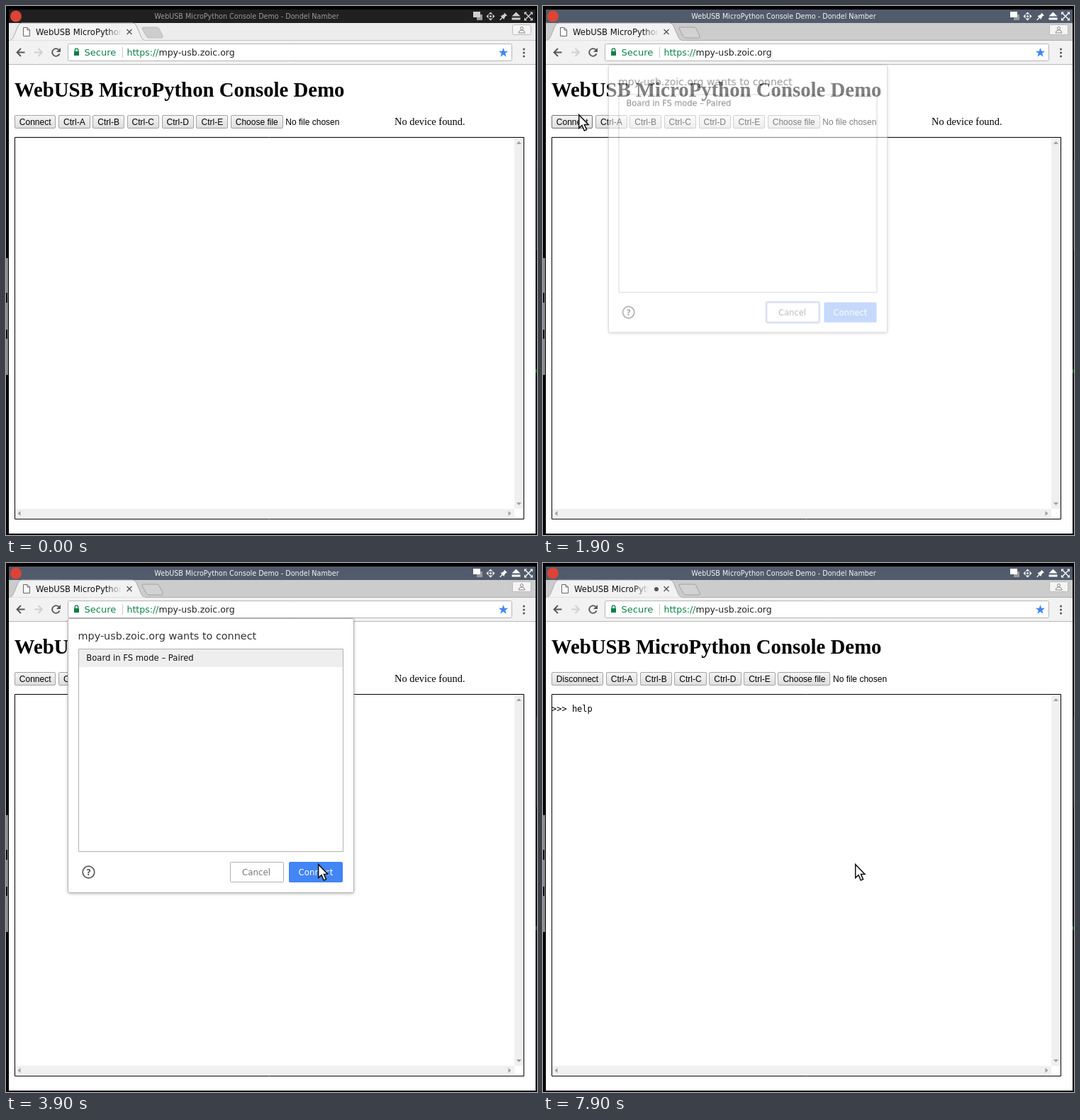
These frames come from a looping animation (749 px wide and 747 px high, 8 s). An HTML page with a canvas:

```html
<!DOCTYPE html>
<html lang="en">
<head>
<meta charset="utf-8">
<title>WebUSB MicroPython Console Demo</title>
<style>
  html, body { margin: 0; width: 100%; height: 100%; overflow: hidden; background: #000; }
  canvas { display: block; }
</style>
</head>
<body>
<canvas id="stage" width="749" height="747"></canvas>
<script>
const stage = document.getElementById('stage');
const screen = stage.getContext('2d');
const layer = Object.assign(document.createElement('canvas'), { width: 749, height: 747 });
const overlay = layer.getContext('2d');
let ctx = screen;

const LOOP = 8000, STEP = 100;
const UI = '"DejaVu Sans", sans-serif';
const SERIF = '"Liberation Serif", serif';
const SANS = '"Liberation Sans", sans-serif';
const MONO = '"DejaVu Sans Mono", monospace';

// time, x, y of the pointer tip
const POINTER = [
  [400, 92, 10], [500, 102, 28], [600, 117, 46],
  [1000, 112, 60], [1100, 92, 95], [1200, 68, 128], [1300, 54, 148], [1400, 50, 153],
  [2000, 84, 163], [2100, 230, 206], [2200, 389, 253], [2400, 307, 185], [2700, 230, 136],
  [3500, 242, 156], [3600, 288, 232], [3700, 352, 326], [3800, 414, 402], [3900, 440, 425]
];

const clamp = v => Math.max(0, Math.min(1, v));

function mix(a, b, k) {
  return `rgb(${a.map((v, i) => Math.round(v + (b[i] - v) * k)).join(',')})`;
}

function rect(x, y, w, h, fill) {
  ctx.fillStyle = fill;
  ctx.fillRect(x, y, w, h);
}

function box(x, y, w, h, radius, fill, stroke, lineWidth = 1) {
  ctx.beginPath();
  ctx.roundRect(x + .5, y + .5, w - 1, h - 1, radius);
  if (fill) { ctx.fillStyle = fill; ctx.fill(); }
  if (stroke) { ctx.strokeStyle = stroke; ctx.lineWidth = lineWidth; ctx.stroke(); }
}

function text(str, x, y, font, fill, align = 'left') {
  ctx.font = font;
  ctx.textAlign = align;
  ctx.fillStyle = fill;
  ctx.fillText(str, x, y);
}

function disc(x, y, r, fill) {
  ctx.beginPath();
  ctx.arc(x, y, r, 0, Math.PI * 2);
  ctx.fillStyle = fill;
  ctx.fill();
}

function ring(x, y, r, stroke, lineWidth) {
  ctx.beginPath();
  ctx.arc(x, y, r, 0, Math.PI * 2);
  ctx.strokeStyle = stroke;
  ctx.lineWidth = lineWidth;
  ctx.stroke();
}

// An SVG path placed at x, y
function shape(d, x, y, fill, stroke, lineWidth = 1) {
  const path = new Path2D(d);
  ctx.save();
  ctx.translate(x, y);
  if (fill) { ctx.fillStyle = fill; ctx.fill(path); }
  if (stroke) { ctx.strokeStyle = stroke; ctx.lineWidth = lineWidth; ctx.stroke(path); }
  ctx.restore();
}

function drawDesktop() {
  rect(0, 0, 749, 747, '#000');
  rect(0, 356, 3, 165, '#8c8c8c');
  rect(0, 405, 2, 14, '#111');
  rect(0, 457, 2, 13, '#111');
  rect(748, 217, 1, 128, '#444');
  rect(748, 395, 1, 110, '#101028');
  rect(747, 513, 2, 5, '#0a5a0a');
}

function drawTitleBar(active) {
  rect(4, 5, 743, 19, active ? '#525b6b' : '#202020');
  const ink = active ? '#f4f4f4' : '#9b9b9b';
  disc(14, 14.5, 8, '#db4437');
  text('WebUSB MicroPython Console Demo - Dondel Namber', 339.5, 18, `9.6px ${UI}`, ink, 'center');
  const icon = active ? '#fff' : '#d0d0d0';
  rect(664, 12, 8, 8, '#999');
  rect(659, 8, 10, 8, icon);
  shape('M0-6l3 3h-6zM0 6l3-3h-6zM-6 0l3-3v6zM6 0l-3-3v6z', 683.5, 14.5, icon);
  disc(683.5, 14.5, 1.5, icon);
  shape('M1-5l4 4-2 .5-2 3-.5 2-2-2-3 3-1 0 0-1 3-3-2-2 2-.5 3-2z', 702, 14.5, icon);
  shape('M0-6l6 6h-12zM-6 2h12v3h-12z', 719.5, 14.5, icon);
  shape('M-6-6h4l-4 4zM6-6h-4l4 4zM-6 6h4l-4-4zM6 6h-4l4-4z', 737, 14.5, icon);
  shape('M-4-4L4 4M4-4L-4 4', 737, 14.5, null, icon, 1.4);
}

function drawTab(active, connected) {
  rect(4, 24, 743, 25, active ? '#cccccc' : '#ececec');
  rect(4, 48, 743, 1, active ? '#adadad' : '#c4c4c4');
  shape('M4 49C9 48 10 45 12 40L17 28Q19 24 22 24H179Q182 24 184 28L190 42Q192 48 197 49Z',
    0, 0, '#f2f2f2', '#aaa');
  rect(5, 48.5, 191, 1.5, '#f2f2f2');
  shape('M194 30H213Q215 30 216 32L221 42Q222 45 219 45H202Q199 45 198 43L192 32Q191 30 194 30Z',
    0, 0, active ? '#d2d2d2' : '#cdcdcd', active ? '#a0a0a0' : '#bcbcbc');

  const shift = connected ? 2 : 0;
  shape('M.5.5H6L9.5 4V12.5H.5ZM6 .5V4H9.5', 24 + shift, 30, '#fff', '#666');
  const end = connected ? 149 : 163;
  const fade = ctx.createLinearGradient(end - 22, 0, end, 0);
  fade.addColorStop(0, '#111');
  fade.addColorStop(1, 'rgba(17,17,17,0)');
  ctx.save();
  ctx.beginPath();
  ctx.rect(40, 26, end - 40, 20);
  ctx.clip();
  text('WebUSB MicroPython Console Demo', 42 + shift, 41, `11.6px ${UI}`, fade);
  ctx.restore();
  if (connected) disc(160, 37, 3, '#555');
  shape('M-3.5-3.5L3.5 3.5M3.5-3.5L-3.5 3.5', 174, 36.5, null, '#555', 1.4);

  box(714, 26, 27, 15, 2, '#f4f4f4', '#bbb');
  ring(727.5, 31.5, 2, '#888', 1);
  shape('M-4.5 4Q-4 0 0 0T4.5 4Z', 727.5, 34, null, '#888');
}

function drawToolbar() {
  rect(4, 49, 743, 33, '#f2f2f2');
  rect(4, 82, 743, 1, '#b8b8b8');
  const arrow = 'M6 0H-5M.5-5.5L-5 0L.5 5.5';
  shape(arrow, 20.5, 65.5, null, '#555', 1.8);
  shape('M-6 0H5M-.5-5.5L5 0L-.5 5.5', 46, 65.5, null, '#cfcfcf', 1.8);
  ctx.beginPath();
  ctx.arc(70.5, 65.5, 5.3, .35, Math.PI * 1.75);
  ctx.strokeStyle = '#555';
  ctx.lineWidth = 1.8;
  ctx.stroke();
  shape('M6.5-6.5V-.5H.5Z', 70.5, 65.5, '#555');

  box(87, 53, 627, 25, 2, '#fff', '#b5b5b5');
  const green = '#0b8043';
  rect(96, 64, 7, 6, green);
  shape('M-2.2 0V-2A2.2 2.2 0 0 1 2.2-2V0', 99.5, 64, null, green, 1.3);
  text('Secure', 110.5, 70, `13px ${UI}`, green);
  rect(164, 58, 1, 15, '#c8c8c8');
  text('https://', 170.5, 70, `12.5px ${UI}`, green);
  text('mpy-usb.zoic.org', 215.5, 70, `12.5px ${UI}`, '#222');

  ctx.beginPath();
  for (let i = 0; i < 10; i++) {
    const r = i % 2 ? 2.8 : 7, a = i * Math.PI / 5 - Math.PI / 2;
    ctx.lineTo(701.5 + r * Math.cos(a), 66 + r * Math.sin(a));
  }
  ctx.fillStyle = '#4285f4';
  ctx.fill();
  for (const y of [61, 66, 71]) disc(730.5, y, 1.5, '#555');
}

function drawButtons(connected, hover, pressed) {
  const labels = [connected ? 'Disconnect' : 'Connect',
    'Ctrl-A', 'Ctrl-B', 'Ctrl-C', 'Ctrl-D', 'Ctrl-E', 'Choose file'];
  const font = `12px ${SANS}`;
  let x = 11.8;
  labels.forEach((label, i) => {
    ctx.font = font;
    const w = ctx.measureText(label).width + 14;
    const left = Math.round(x), right = Math.round(x + w);
    const lit = hover && i === 0;
    const shade = ctx.createLinearGradient(0, 154, 0, 173);
    const tones = lit && pressed ? ['#d6d6d6', '#e6e6e6'] : ['#f5f5f5', '#dddddd'];
    tones.forEach((c, k) => shade.addColorStop(k, c));
    box(left, 154, right - left, 19, 1.5, shade, lit ? '#707070' : '#a3a3a3');
    text(label, x + 7, 168, font, '#000');
    x += w + 3.6;
  });
  text('No file chosen', x, 168, font, '#000');
  if (!connected) text('No device found.', 548, 168, `14.4px ${SERIF}`, '#000');
}

function drawConsole(typed) {
  box(12, 185, 719, 540, 0, '#fff', '#000');
  rect(717, 186, 13, 525, '#f0f0f0');
  rect(13, 710, 704, 13, '#f0f0f0');
  rect(717, 710, 13, 13, '#fff');
  const gray = '#a0a0a0';
  shape('M-3.5 2L0-2L3.5 2Z', 723.5, 193, gray);
  shape('M-3.5-2L0 2L3.5-2Z', 723.5, 703, gray);
  shape('M2-3.5L-2 0L2 3.5Z', 18.5, 716.5, gray);
  shape('M-2-3.5L2 0L-2 3.5Z', 710.5, 716.5, gray);
  text(typed, 12, 210, `12px ${MONO}`, '#000');
}

function drawDialog(chosen, pressed) {
  ctx.save();
  ctx.shadowColor = 'rgba(0,0,0,.4)';
  ctx.shadowBlur = 5;
  ctx.shadowOffsetY = 1;
  rect(88, 79, 402, 386, '#fff');
  ctx.restore();
  box(87, 78, 404, 388, 2, null, '#b4b4b4');
  text('mpy-usb.zoic.org wants to connect', 101.5, 108, `14.4px ${UI}`, '#333');
  box(102, 121, 374, 287, 0, '#fff', '#b0b0b0');
  if (chosen > 0) rect(103, 122, 372, 25, mix([255, 255, 255], [238, 238, 238], chosen));
  text('Board in FS mode – Paired', 113.3, 138, `11.6px ${UI}`, '#111');

  ring(116.5, 436.5, 8.3, '#5a5a5a', 1.7);
  text('?', 116.5, 441, `bold 11.5px ${UI}`, '#5a5a5a', 'center');

  if (chosen < 1) {
    ctx.globalAlpha = 1 - chosen;
    box(315, 421, 78, 31, 2, null, '#a9c1f0', 2);
    ctx.globalAlpha = 1;
  }
  box(316, 422, 76, 29, 1, '#fff', mix([170, 185, 215], [176, 176, 176], chosen));
  text('Cancel', 353, 440.5, `11.8px ${UI}`, '#777', 'center');
  const blue = pressed ? '#3275e4' : mix([140, 180, 249], [66, 133, 244], chosen);
  box(399, 422, 76, 29, 1, blue, blue);
  text('Connect', 437, 440.5, `11.8px ${UI}`, '#fff', 'center');
}

function dialogOpacity(t) {
  if (t < 3000) return clamp((t - 1775) / 250);
  return clamp((4200 - t) / 200);
}

function showDialog(t) {
  const alpha = dialogOpacity(t);
  if (!alpha) return;
  ctx = overlay;
  ctx.clearRect(0, 0, 749, 747);
  drawDialog(clamp((t - 3000) / 300), t >= 4000);
  ctx = screen;
  const scale = .952 + .048 * alpha;
  ctx.save();
  ctx.globalAlpha = alpha;
  ctx.translate(289, 272);
  ctx.scale(scale, scale);
  ctx.drawImage(layer, -289, -272);
  ctx.restore();
}

function drawPointer(t) {
  const key = POINTER.findLast(p => p[0] <= t);
  if (!key) return;
  shape('M.7.7V19.5L5 15.6L8.3 23L11.6 21.6L8.4 14.4H14Z', key[1], key[2], '#fff', '#111', 1.5);
}

function typedText(t) {
  if (t < 6400) return '';
  return '>>> ' + 'help'.slice(0, Math.max(0, Math.floor((t - 7100) / 200)));
}

function draw(t) {
  const active = t >= 400, connected = t >= 4300;
  drawDesktop();
  drawTitleBar(active);
  drawTab(active, connected);
  drawToolbar();
  rect(4, 83, 743, 662, '#fff');
  text('WebUSB MicroPython Console Demo', 11.7, 128, `bold 28.8px ${SERIF}`, '#000');
  drawButtons(connected, t >= 1300 && t < 2100, t === 1700);
  drawConsole(typedText(t));
  showDialog(t);
  drawPointer(t);
}

function frame() {
  const t = performance.now() % LOOP;
  draw(Math.floor(t / STEP) * STEP);
  requestAnimationFrame(frame);
}
frame();
</script>
</body>
</html>
```
